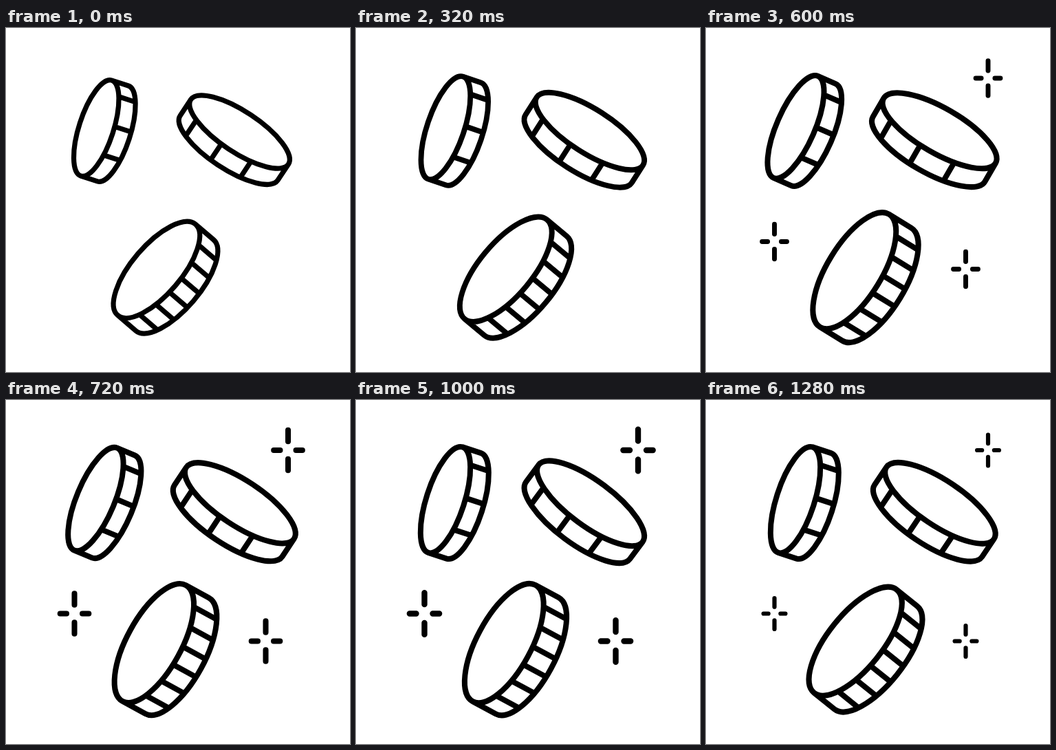
Animation, 500 px wide and 500 px high, one loop 1.32 s. Source, as an HTML page:

```html
<!DOCTYPE html>
<html lang="en">
<head>
<meta charset="utf-8">
<title>Coins</title>
<style>
  html, body { margin: 0; width: 100%; height: 100%; overflow: hidden; background: #fff; }
  svg { display: block; width: 100%; height: 100%; fill: none; stroke: #000; stroke-width: 8; stroke-linejoin: round; }
  .spark { stroke-width: 8.6; stroke-linecap: round; }
</style>
</head>
<body>
<svg viewBox="0 0 500 500"></svg>
<script>
const LOOP = 1320;
const LINEAR = 'linear';
const OUT = 'cubic-bezier(.333,.667,.667,1)';
const IN = 'cubic-bezier(.333,0,.667,.333)';
const IN_OUT = 'cubic-bezier(.37,0,.63,1)';
const SOFT_OUT = 'cubic-bezier(.333,.45,.667,.85)';
const SOFT_IN = 'cubic-bezier(.333,.15,.667,.55)';
const GROW = 'cubic-bezier(.33,.2,.67,.85)';

// a, b: long and short radius of the face; d: half the thickness;
// ticks: rim marks along the long axis; turn: [ms, degrees, easing]
const coins = [
  { x: 143.3, y: 149.5, a: 80.7, b: 27.6, d: 14, tilt: 18, ticks: [-59.3, -11.5, 37.5],
    turn: [[300, 0, OUT], [600, 5.6, IN], [900, 0, LINEAR]] },
  { x: 331.8, y: 162.7, a: 94, b: 32.7, d: 15.5, tilt: 123.5, ticks: [68.5, 13.9, -41.4],
    turn: [[300, 0, OUT], [500, -4.6, IN_OUT], [900, 3.3, IN], [1300, 0, LINEAR]] },
  { x: 232, y: 362.6, a: 96.1, b: 39.5, d: 19, tilt: 40.5, ticks: [-74, -45, -15.5, 14, 43, 72.5],
    turn: [[300, 0, SOFT_OUT], [890, -14.5, SOFT_IN], [1320, 0, LINEAR]] }
];
const sparks = [[410, 73], [99.5, 310.5], [377.5, 350.5]];

const svg = document.querySelector('svg');

function add(parent, tag, attrs) {
  const el = document.createElementNS(svg.namespaceURI, tag);
  for (const key in attrs) el.setAttribute(key, attrs[key]);
  return parent.appendChild(el);
}

function play(el, prop, steps, unit = '') {
  const first = steps[0], last = steps[steps.length - 1];
  const all = [...steps];
  if (first[0] > 0) all.unshift([0, first[1], LINEAR]);
  if (last[0] < LOOP) all.push([LOOP, last[1], LINEAR]);
  const frames = all.map(([ms, value, easing]) => ({ offset: ms / LOOP, [prop]: value + unit, easing }));
  el.animate(frames, { duration: LOOP, iterations: Infinity });
}

function coinPath({ a, b, d, ticks }) {
  const rim = `M${-d} ${-a}H${d}A${b} ${a} 0 0 1 ${d} ${a}H${-d}A${b} ${a} 0 0 1 ${-d} ${-a}Z`;
  const face = `M${-d} ${-a}A${b} ${a} 0 0 1 ${-d} ${a}`;
  const marks = ticks.map(y => `M${b * Math.sqrt(1 - (y / a) ** 2) - d} ${y}h${2 * d}`);
  return rim + face + marks.join('');
}

for (const coin of coins) {
  const place = add(svg, 'g', { transform: `translate(${coin.x} ${coin.y})` });
  const body = add(place, 'g');
  add(body, 'path', { d: coinPath(coin) });
  play(body, 'rotate', coin.turn.map(([ms, deg, easing]) => [ms, coin.tilt + deg, easing]), 'deg');
  play(body, 'scale', [[0, 0.905, GROW], [470, 1, LINEAR]]);
}

for (const [x, y] of sparks) {
  const place = add(svg, 'g', { transform: `translate(${x} ${y})` });
  const star = add(place, 'g', { class: 'spark' });
  add(star, 'path', { d: 'M12.3 0H22.2M-12.3 0H-22.2M0 13.7V31.2M0-13.7V-31.2' });
  play(star, 'scale', [[0, 0, LINEAR], [510, 0, LINEAR], [510, 0.66, OUT], [880, 1, IN], [LOOP, 0.66, LINEAR]]);
}
</script>
</body>
</html>
```
